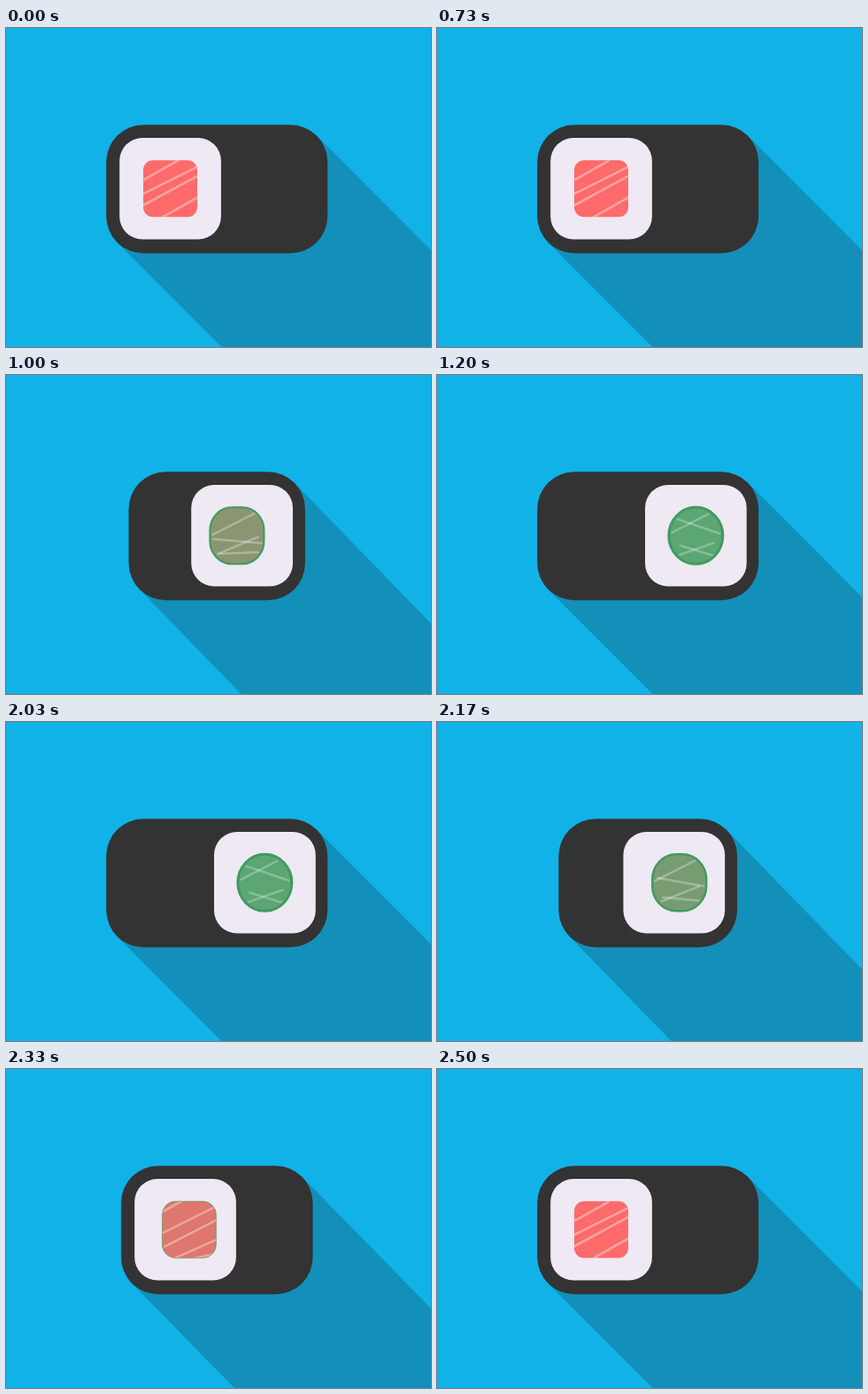
These frames come from a looping animation (480x360 px, 2.71 s). An HTML page:

```html
<!DOCTYPE html>
<html lang="en">
<head>
<meta charset="utf-8">
<title>Sushi toggle</title>
<style>
  html, body { margin: 0; width: 100%; height: 100%; overflow: hidden; background: #11b2e7; }
  svg { display: block; width: 100%; height: 100%; }
</style>
</head>
<body>
<svg viewBox="0 0 480 360">
  <defs>
    <clipPath id="cut"><rect id="cutBox" x="-30.5" y="-32" width="61" height="64"/></clipPath>
  </defs>
  <rect width="480" height="360" fill="#11b2e7"/>
  <path id="shadow" fill="#1290ba"/>
  <rect id="body" y="109.3" height="145" rx="42" fill="#333"/>
  <rect id="rice" y="124" width="114.7" height="114.5" rx="26" fill="#eee9f3"/>
  <g id="filling">
    <rect id="core" x="-30.5" y="-32" width="61" height="64"/>
    <g id="lines" clip-path="url(#cut)" stroke="#fff" stroke-width="2.5"></g>
    <rect id="rim" x="-30.5" y="-32" width="61" height="64" fill="none" stroke="#429a62"/>
  </g>
</svg>
<script>
const LOOP = 2710, START = 736, BACK = 2036, DURATION = 450, LAG = 16;
const SALMON = [255, 107, 107], CUCUMBER = [91, 166, 115];

// Each stripe: [x1, y1, x2, y2] in the salmon, then in the cucumber
const STRIPES = [
  [[-30, -10, 9, -32], [-60, -45, -10, -70]],
  [[-31, 6, 37, -28], [-28, -3, 15, -25]],
  [[-31, 19, 34, -16], [-19, 22, 21, 8]],
  [[-28, 43, 34, 8], [-18, 11, 21, 23]],
  [[-42, 58, 32, 34], [-22, -19, 28, -2]]
];

const $ = id => document.getElementById(id);
const mix = (a, b, k) => a + (b - a) * k;
const set = (el, attrs) => {
  for (const name in attrs) el.setAttribute(name, attrs[name]);
};

const stripes = STRIPES.map(() => {
  const line = document.createElementNS('http://www.w3.org/2000/svg', 'line');
  return $('lines').appendChild(line);
});

// cubic-bezier(.42, 0, .42, 1)
function ease(u) {
  if (u <= 0) return 0;
  if (u >= 1) return 1;
  let lo = 0, hi = 1;
  for (let i = 0; i < 24; i++) {
    const s = (lo + hi) / 2;
    const x = 1.26 * s * (1 - s) + s ** 3;
    if (x < u) lo = s; else hi = s;
  }
  return lo * lo * (3 - 2 * lo);
}

const progress = t => ease((t - START) / DURATION) - ease((t - BACK) / DURATION);

function drawShadow(left, right, squeeze) {
  const x1 = left + 12.3, y1 = 242, x2 = right - 12.3, y2 = 121.6;
  const far = 500, drop = far * (1 + 0.06 * squeeze);
  set($('shadow'), {
    d: `M${x1} ${y1}L${x2} ${y2}L${x2 + far} ${y2 + drop}L${x1 + far} ${y1 + drop}Z`
  });
}

function draw(t) {
  const p = progress(t), q = progress(t - LAG);
  const squeeze = 1 - Math.abs(2 * p - 1);
  const width = 250 - 105 * squeeze, left = 238.2 - width / 2;

  drawShadow(left, left + width, squeeze);
  set($('body'), { x: left, width });
  set($('rice'), { x: mix(128.2, 235, p) });

  set($('filling'), { transform: `translate(${mix(185.5, 292.3, q)} 181.3)` });
  const rx = mix(11, 30.5, q), ry = mix(11, 32, q);
  for (const id of ['core', 'cutBox', 'rim']) set($(id), { rx, ry });
  const rgb = SALMON.map((c, i) => Math.round(mix(c, CUCUMBER[i], q)));
  set($('core'), { fill: `rgb(${rgb})` });
  set($('rim'), { 'stroke-width': 3 * q });
  set($('lines'), { 'stroke-opacity': mix(0.38, 0.26, q) });
  stripes.forEach((line, i) => {
    const [from, to] = STRIPES[i];
    const [x1, y1, x2, y2] = from.map((v, j) => mix(v, to[j], q));
    set(line, { x1, y1, x2, y2 });
  });
}

const origin = performance.now();
function tick() {
  draw((performance.now() - origin) % LOOP);
  requestAnimationFrame(tick);
}
tick();
</script>
</body>
</html>
```
